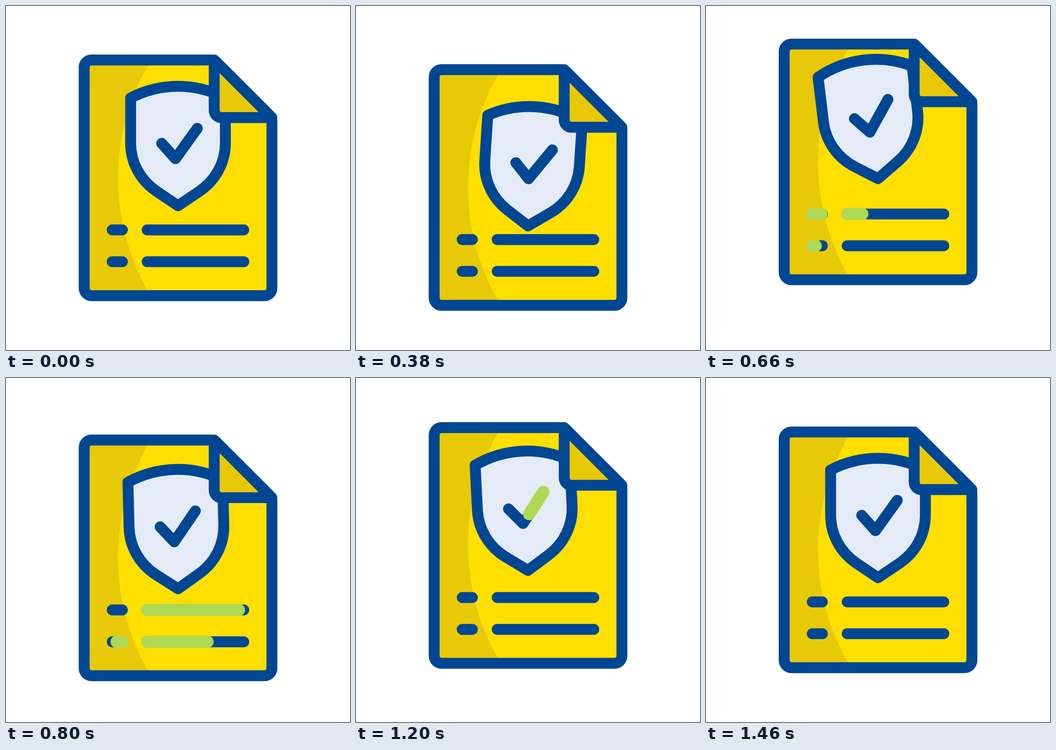
Recreate the animation shown at these times as an HTML page with a canvas. Size 748x748 px, loop 1.56 s.

```html
<!DOCTYPE html>
<html lang="en">
<head>
<meta charset="utf-8">
<title>Protected document</title>
<style>
  html, body { margin: 0; width: 100%; height: 100%; overflow: hidden; background: #fff; }
  canvas { display: block; width: 100vw; height: 100vh; }
</style>
</head>
<body>
<canvas id="stage" width="748" height="748"></canvas>
<script>
const ctx = document.getElementById('stage').getContext('2d');
const LOOP = 1560, STEP = 20;
const BLUE = '#004793', YELLOW = '#ffdf00', SHADE = '#e7c907', PALE = '#e5ebf6', GREEN = '#afd952';
const WEIGHT = 23.7, GLOW_WEIGHT = 26.8;
const TIP = { x: 374, y: 434.3 };

// [time, value] keys, eased in and out between neighbours
const docY = [[200, 0], [420, 23], [600, -45], [842, 23], [1117, -12], [1395, 0]];
const shieldY = [[200, 0], [420, 48], [600, -75], [850, 35.5], [1155, -17], [1460, 0]];
const shieldTurn = [[200, 0], [420, 4.1], [640, -7], [945, 3.35], [1210, -3], [1460, 0]];

// grow / shrink: [start, duration] of the highlight's two ends
const bars = [
  { x1: 231, x2: 253, y: 486.8, grow: [541, 150], shrink: [685, 110] },
  { x1: 307, x2: 517, y: 486.8, grow: [603, 228], shrink: [826, 228] },
  { x1: 231, x2: 253, y: 556, grow: [602, 150], shrink: [749, 110] },
  { x1: 307, x2: 517, y: 556, grow: [667, 228], shrink: [880, 228] }
];
const check = { points: [[338.6, 298.7], [368.5, 332], [416, 266]], grow: [882, 220], shrink: [1083, 220] };

const ease = u => { u = Math.min(1, Math.max(0, u)); return u * u * (3 - 2 * u); };
const span = (t, [start, length]) => ease((t - start) / length);

function valueAt(keys, t) {
  let value = keys[0][1];
  for (let i = 1; i < keys.length; i++) {
    const [t0, v0] = keys[i - 1], [t1, v1] = keys[i];
    if (t > t0) value = v0 + (v1 - v0) * ease((t - t0) / (t1 - t0));
  }
  return value;
}

function fill(path, color) {
  ctx.fillStyle = color;
  ctx.fill(path);
}

function stroke(path, color = BLUE, width = WEIGHT) {
  ctx.strokeStyle = color;
  ctx.lineWidth = width;
  ctx.stroke(path);
}

function polyline(points) {
  const path = new Path2D();
  points.forEach(([x, y]) => path.lineTo(x, y));
  return path;
}

function page() {
  const p = new Path2D();
  p.moveTo(300, 117.3);
  p.arcTo(452.9, 117.3, 578.2, 242.6, 16);
  p.arcTo(578.2, 242.6, 578.2, 629.8, 16);
  p.arcTo(578.2, 629.8, 170, 629.8, 16);
  p.arcTo(170, 629.8, 170, 117.3, 16);
  p.arcTo(170, 117.3, 300, 117.3, 16);
  p.closePath();
  return p;
}

function fold() {
  const p = new Path2D();
  p.moveTo(452.7, 117.3);
  p.arcTo(452.7, 242.7, 578, 242.7, 16);
  p.lineTo(578, 242.7);
  p.closePath();
  return p;
}

function shield() {
  const p = new Path2D(), side = Math.atan2(197, 103);
  p.arc(374, 397, 222.3, -Math.PI + side, -side);
  p.lineTo(477, 298);
  p.bezierCurveTo(477, 340, 456, 379, 421, 402.6);
  p.lineTo(TIP.x, TIP.y);
  p.lineTo(327, 402.6);
  p.bezierCurveTo(292, 379, 271, 340, 271, 298);
  p.closePath();
  return p;
}

const pagePath = page(), foldPath = fold(), shieldPath = shield();
const shadeCircle = new Path2D();
shadeCircle.arc(737.5, 374, 494, 0, Math.PI * 2);

function drawHighlighted(points, { grow, shrink }, t) {
  const path = polyline(points);
  stroke(path);
  const from = span(t, shrink), to = span(t, grow);
  if (to - from < 0.001) return;
  const length = points.slice(1).reduce(
    (sum, [x, y], i) => sum + Math.hypot(x - points[i][0], y - points[i][1]), 0);
  ctx.setLineDash([length * (to - from), length * 2]);
  ctx.lineDashOffset = -length * from;
  stroke(path, GREEN, GLOW_WEIGHT);
  ctx.setLineDash([]);
}

function drawPage(t) {
  fill(pagePath, SHADE);
  ctx.save();
  ctx.clip(pagePath);
  fill(shadeCircle, YELLOW);
  ctx.restore();
  for (const bar of bars) drawHighlighted([[bar.x1, bar.y], [bar.x2, bar.y]], bar, t);
}

function drawShield(t) {
  ctx.translate(TIP.x, TIP.y + valueAt(shieldY, t));
  ctx.rotate(valueAt(shieldTurn, t) * Math.PI / 180);
  ctx.translate(-TIP.x, -TIP.y);
  fill(shieldPath, PALE);
  stroke(shieldPath);
  drawHighlighted(check.points, check, t);
}

function drawOutline() {
  fill(foldPath, SHADE);
  stroke(foldPath);
  stroke(pagePath);
}

function layer(y, draw, t) {
  ctx.save();
  ctx.translate(0, y);
  draw(t);
  ctx.restore();
}

function render(now) {
  const t = Math.floor((now % LOOP) / STEP) * STEP;
  const y = valueAt(docY, t);
  ctx.fillStyle = '#fff';
  ctx.fillRect(0, 0, 748, 748);
  ctx.lineCap = ctx.lineJoin = 'round';
  layer(y, drawPage, t);
  layer(0, drawShield, t);
  layer(y, drawOutline, t);
}

let begin;
function tick(now) {
  begin ??= now;
  render(now - begin);
  requestAnimationFrame(tick);
}
render(0);
requestAnimationFrame(tick);
</script>
</body>
</html>
```
